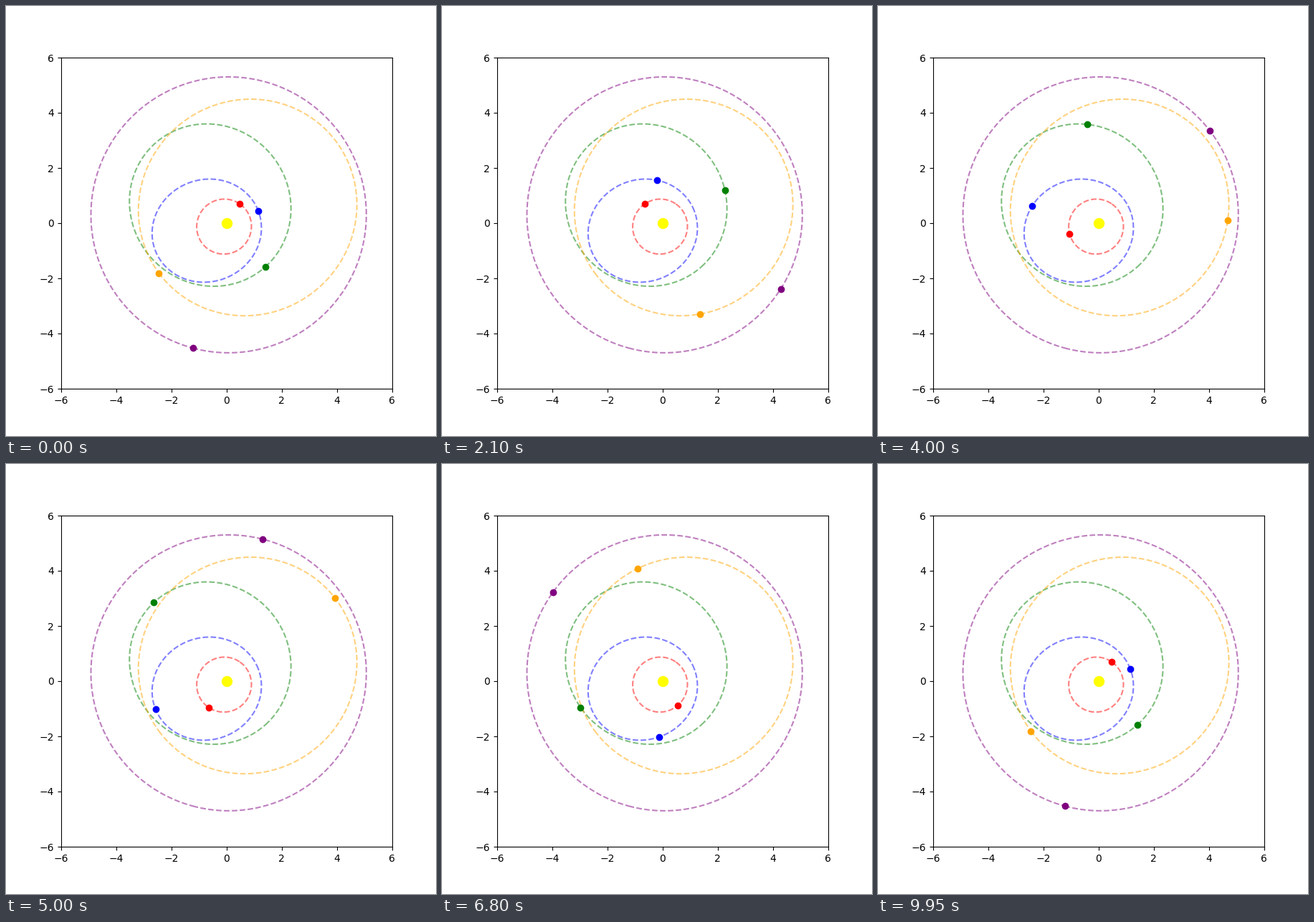
A matplotlib script for the animation above (10 s loop, 600x600 px).

```python
import numpy as np
import matplotlib.pyplot as plt
from matplotlib.animation import FuncAnimation

FRAMES = 200
INTERVAL = 50
COLORS = ["red", "blue", "green", "orange", "purple"]

np.random.seed(42)
semi_axes = np.arange(1, 6)
eccentricities = 0.4 * np.random.rand(5)
rotations = 2 * np.pi * np.random.rand(5)
theta = np.linspace(0, 2 * np.pi, FRAMES)


def orbit(a, e, rotation):
    """Ellipse with one focus at the origin, starting at its nearest point."""
    r = a * (1 - e**2) / (1 + e * np.cos(theta))
    return r * np.cos(theta + rotation), r * np.sin(theta + rotation)


fig, ax = plt.subplots(figsize=(6, 6), dpi=100)
ax.set_xlim(-6, 6)
ax.set_ylim(-6, 6)
ax.set_aspect("equal")

ax.plot(0, 0, "o", color="yellow", markersize=10)
paths = [orbit(*p) for p in zip(semi_axes, eccentricities, rotations)]
for (x, y), color in zip(paths, COLORS):
    ax.plot(x, y, "--", color=color, alpha=0.5)
planets = [ax.plot([], [], "o", color=color)[0] for color in COLORS]


def update(frame):
    for planet, (x, y) in zip(planets, paths):
        planet.set_data([x[frame]], [y[frame]])
    return planets


anim = FuncAnimation(fig, update, frames=FRAMES, interval=INTERVAL,
                     init_func=lambda: update(0), repeat=True)
plt.show()
```
